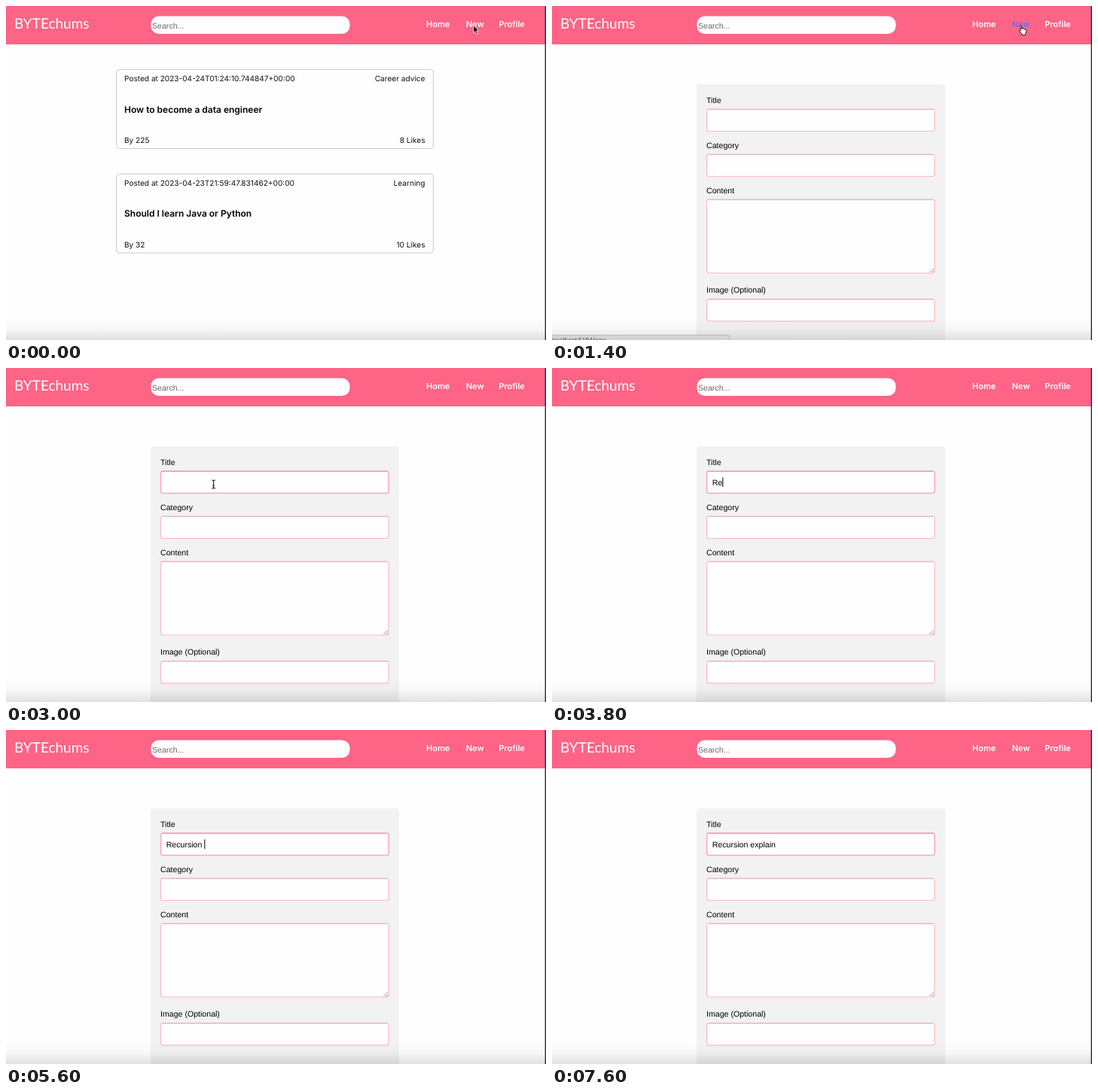
An HTML page that plays this animation: 717x444 px, repeating every 8 s.

```html
<!DOCTYPE html>
<html lang="en">
<head>
<meta charset="utf-8">
<style>
  html, body { margin: 0; width: 100%; height: 100%; overflow: hidden; background: #fefefe; }
  svg { display: block; text-rendering: geometricPrecision; }
  text { font: 10.1px Inter, sans-serif; fill: #111; white-space: pre; }
  .brand { font: 19px Lato, sans-serif; fill: #fff; }
  .nav { font-weight: 600; font-size: 11px; fill: #fff; }
  .nav.hover { fill: #646cff; }
  .heading { font-weight: 600; font-size: 12px; fill: #000; }
  .end { text-anchor: end; }
  .form { font: 10.6px "Liberation Sans", Arial, sans-serif; fill: #000; }
  .hint { fill: #6a6a6a; }
  .url { font: 8.5px "Liberation Sans", Arial, sans-serif; fill: #444; }
  .card { fill: #fefefe; stroke: #cbcbcb; }
  .field { fill: #fefefe; stroke: #ffb9c4; stroke-width: 1.2; }
  .field.focus { stroke: #fba9b6; stroke-width: 1.5; }
</style>
</head>
<body>
<svg id="stage" width="717" height="444" viewBox="0 0 717 444"></svg>
<script>
const LOOP = 8000, STEP = 200;
const stage = document.getElementById('stage');

const text = (x, y, content, cls = '', id = '') =>
  `<text x="${x}" y="${y}" class="${cls}" id="${id}">${content}</text>`;

const card = (y, posted, topic, heading, author, likes) => `
  <rect class="card" x="146.5" y="${y + .5}" width="421" height="105" rx="4"/>
  ${text(157, y + 16, 'Posted at ' + posted)}
  ${text(556.5, y + 16, topic, 'end')}
  ${text(157, y + 57.5, heading, 'heading')}
  ${text(157, y + 98, 'By ' + author)}
  ${text(556.5, y + 98, likes + ' Likes', 'end')}`;

const field = (y, height, label, labelY, id = '') => `
  ${text(205, labelY, label, 'form')}
  <rect class="field" id="${id}" x="205.5" y="${y}" width="302.5" height="${height}" rx="3"/>
  <path d="M207.5 ${y + .7}H506" stroke="#000" stroke-opacity=".17"/>`;

stage.innerHTML = `
  <defs><linearGradient id="shade" x2="0" y2="1">
    <stop stop-opacity="0"/><stop offset=".5" stop-opacity=".025"/><stop offset="1" stop-opacity=".12"/>
  </linearGradient></defs>
  <rect width="717" height="51" fill="#fd6486"/>
  ${text(11, 30, 'BYTEchums', 'brand')}
  <rect x="192.5" y="13.5" width="264" height="23.5" rx="10.5" fill="#fefefe"/>
  ${text(194, 29.6, 'Search...', 'form hint')}
  ${text(558, 27.5, 'Home', 'nav')}
  ${text(610.7, 27.5, 'New', 'nav', 'link')}
  ${text(654.3, 27.5, 'Profile', 'nav')}
  <g id="feed">
    ${card(84, '2023-04-24T01:24:10.744847+00:00', 'Career advice', 'How to become a data engineer', 225, 8)}
    ${card(222.7, '2023-04-23T21:59:47.831462+00:00', 'Learning', 'Should I learn Java or Python', 32, 10)}
  </g>
  <g id="editor">
    <rect x="192" y="104" width="330" height="350" rx="4" fill="#f2f2f2"/>
    ${field(137, 29.5, 'Title', 128.6, 'title')}
    ${field(197, 29.5, 'Category', 188.7)}
    ${field(257, 98, 'Content', 248.7)}
    ${field(389.5, 29.7, 'Image (Optional)', 381.4)}
    <path d="M501.5 354L507 348.5M505 354L507 352" stroke="#777" stroke-width=".8"/>
    ${text(212.7, 155.6, '', 'form', 'typed')}
    <rect id="caret" y="145.5" width="1" height="12.5"/>
  </g>
  <rect y="414" width="717" height="30" fill="url(#shade)"/>
  <g id="status">
    <rect id="bubble" x="-5" y="437.5" height="12" rx="3" fill="#d4d4d4" stroke="#bcbcbc"/>
    ${text(-1, 446.5, 'localhost:5184/new', 'url')}
  </g>
  <path d="M716.3 0V444" stroke="#33244f" stroke-width="1.4"/>
  <g id="pointer">
    <path id="arrow" d="M0 0V10.2L2.3 8.1L3.9 11.6L5.7 10.8L4.1 7.4H7.2Z" fill="#000" stroke="#fff" stroke-width=".8"/>
    <path id="hand" d="M1.3 1C1.3-.3 3-.3 3.1 1L3.4 4.6C4-.1 5.5 4.2 5.5 5C6 4.2 7.3 4.5 7.4 5.4C8 4.8 9.2 5.2 9.2 6.2C9.3 8.5 8.6 9.7 8.1 10.7V12.4H3.3V11C2.2 9.8 1 8.3.2 7.2C-.4 6.2.9 5.6 1.9 6.9Z" fill="#fff" stroke="#111" stroke-width=".9"/>
    <path id="beam" d="M-2.5-5.5Q0-5.5 0-4V4Q0 5.5 2.5 5.5M2.5-5.5Q0-5.5 0-4M0 4Q0 5.5-2.5 5.5M-1.3 1.5H1.3" fill="none" stroke="#222" stroke-width="1.1"/>
  </g>`;

const el = Object.fromEntries([...stage.querySelectorAll('[id]')].map(node => [node.id, node]));
const show = (node, visible) => node.style.display = visible ? '' : 'none';

// [time, characters typed]
const keys = [[3200, 1], [3600, 2], [4000, 3], [4200, 5], [4400, 7], [4600, 10],
              [6000, 11], [6200, 12], [6400, 13], [6600, 14], [6800, 15], [7000, 17]];
const FOCUS = 2100;

function render(time) {
  const t = Math.floor(time % LOOP / STEP) * STEP;
  const hovering = t >= 600 && t < 1800, editing = t >= 1400, focused = t >= FOCUS;

  show(el.feed, !editing);
  show(el.editor, editing);
  el.link.classList.toggle('hover', hovering);
  el.title.classList.toggle('focus', focused);

  show(el.status, t >= 800 && t < 2200);
  el.status.style.opacity = t < 1800 ? 1 : t < 2000 ? .6 : .2;
  el.bubble.setAttribute('width', editing ? 241 : 84);

  const [keyTime, count] = keys.filter(key => key[0] <= t).pop() || [FOCUS, 0];
  el.typed.textContent = 'Recursion explain'.slice(0, count);
  show(el.caret, focused && (t - keyTime) % 1000 < 500);
  el.caret.setAttribute('x', 212.7 + (count ? el.typed.getComputedTextLength() : 0));

  const [x, y] = t < 600 ? [620.5, 25.5] : t < 1800 ? [620.5, 26] : t < 2000 ? [420, 98] : [275.6, 154.5];
  el.pointer.setAttribute('transform', `translate(${x} ${y})`);
  show(el.pointer, t < 3200);
  show(el.hand, hovering);
  show(el.beam, t >= 2000);
  show(el.arrow, !hovering && t < 2000);
}

const start = performance.now();
function tick() {
  render(performance.now() - start);
  requestAnimationFrame(tick);
}
tick();
</script>
</body>
</html>
```
